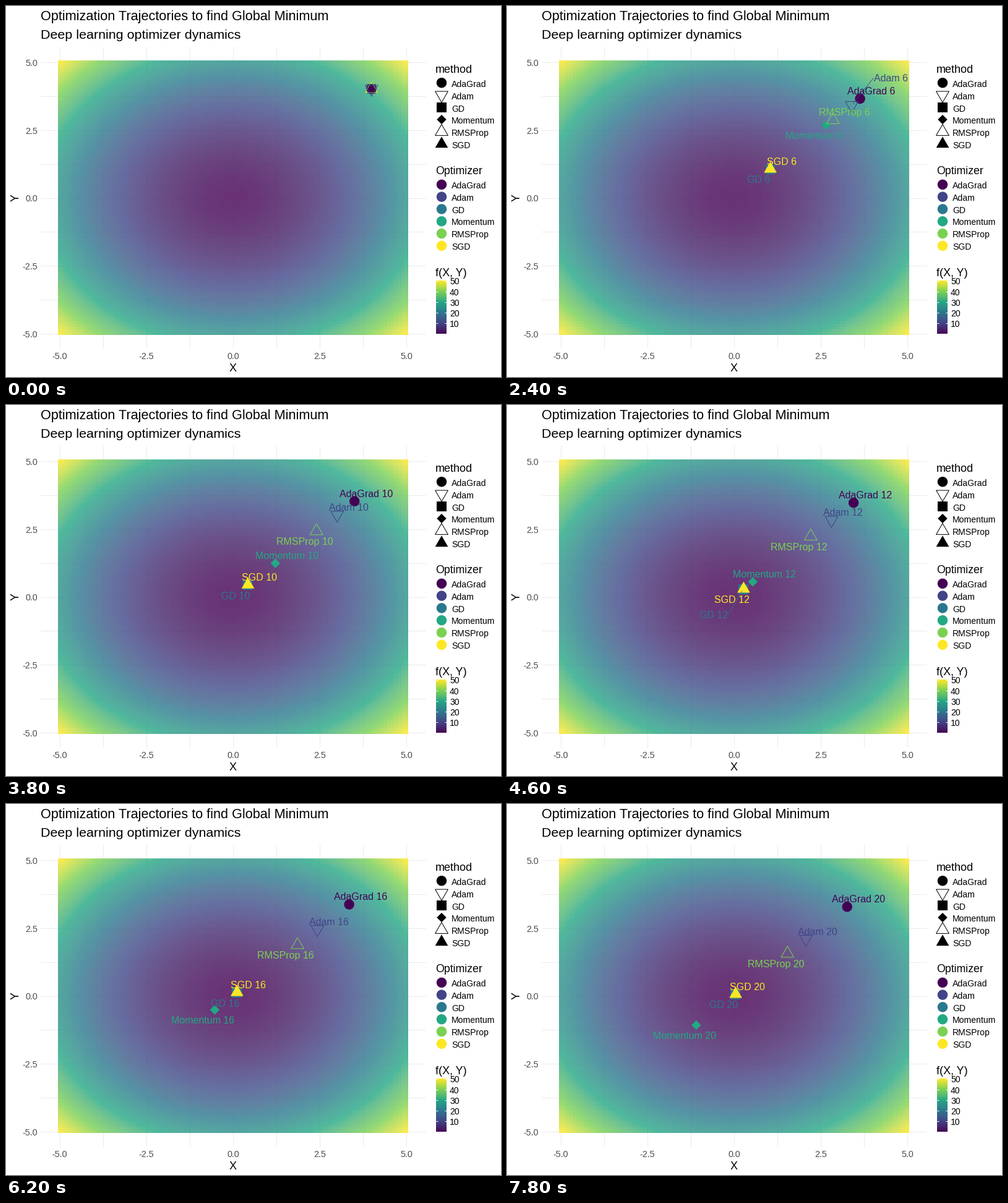
Animation, 800 px wide and 600 px high, one loop 8000 ms. Source, as a matplotlib script:

```python
import numpy as np
import matplotlib.pyplot as plt
from matplotlib.animation import FuncAnimation
from matplotlib.colors import ListedColormap, to_rgb
from matplotlib.patches import Polygon

W, H, DPI = 800, 600, 100
PX = 72 / DPI                      # points per pixel
FRAMES, INTERVAL = 40, 200
STEPS = FRAMES // 2

plt.rcParams["font.family"] = "Liberation Sans"
plt.rcParams["toolbar"] = "None"

NAMES = ["AdaGrad", "Adam", "GD", "Momentum", "RMSProp", "SGD"]
PALETTE = ["#440154", "#414487", "#2A788E", "#22A884", "#7AD151", "#FDE725"]
COLORS = dict(zip(NAMES, PALETTE))
DRAW_ORDER = ["GD", "SGD", "Momentum", "AdaGrad", "RMSProp", "Adam"]
LABEL_ORDER = ["AdaGrad", "SGD", "GD", "Momentum", "RMSProp", "Adam"]

# labels sit on one of two sides of their point, y pointing down
ABOVE, BELOW = np.array((18.5, -13)), np.array((-19, 16.5))
HOME_ABOVE = {"AdaGrad", "Adam", "SGD"}
REACHES = (1, 2.5, 3.4)
LABEL_H = 16

# marker outlines
R = 7.7
ANG = np.linspace(0, 2 * np.pi, 48, endpoint=False)
CIRCLE = 8.2 * np.column_stack([np.cos(ANG), np.sin(ANG)])
UP = R * np.array([(0, -1.555), (1.347, 0.778), (-1.347, 0.778)])
SHAPES = {
    "AdaGrad": CIRCLE,
    "Adam": UP * (1, -1),
    "GD": R * np.array([(-1, -1), (1, -1), (1, 1), (-1, 1)]),
    "Momentum": R * np.array([(0, -1), (1, 0), (0, 1), (-1, 0)]),
    "RMSProp": UP,
    "SGD": UP,
}
HOLLOW = {"Adam", "RMSProp"}


def lab_gradient(colors, n=512):
    """Colormap that blends the colours in CIE Lab space."""
    to_xyz = np.array([[0.4124, 0.3576, 0.1805],
                       [0.2126, 0.7152, 0.0722],
                       [0.0193, 0.1192, 0.9505]])
    to_lab = np.array([[0, 116, 0], [500, -500, 0], [0, 200, -200]])
    white = to_xyz.sum(axis=1)
    rgb = np.array([to_rgb(c) for c in colors])
    lin = np.where(rgb > 0.04045, ((rgb + 0.055) / 1.055) ** 2.4, rgb / 12.92)
    xyz = lin @ to_xyz.T / white
    f = np.where(xyz > 0.008856, np.cbrt(xyz), 7.787 * xyz + 16 / 116)
    lab = f @ to_lab.T
    t = np.linspace(0, len(colors) - 1, n)
    lab = np.column_stack([np.interp(t, range(len(colors)), c) for c in lab.T])
    f = lab @ np.linalg.inv(to_lab).T
    xyz = np.where(f > 0.2069, f ** 3, (f - 16 / 116) / 7.787) * white
    lin = np.clip(xyz @ np.linalg.inv(to_xyz).T, 0, 1)
    rgb = np.where(lin > 0.0031308, 1.055 * lin ** (1 / 2.4) - 0.055,
                   12.92 * lin)
    return ListedColormap(np.clip(rgb, 0, 1))


CMAP = lab_gradient(PALETTE)


def px(x):
    return 367 + 56.04 * x


def py(y):
    return 310 - 43.96 * y


def trajectories():
    """Coordinate (x = y) of every optimizer on f = x^2 + y^2."""
    x = {n: [4.0] for n in NAMES}
    vel = acc = sq = m = v = 0.0
    for t in range(1, STEPS + 1):
        g = {n: 2 * x[n][-1] for n in NAMES}
        vel = 0.9 * vel + 0.01 * g["Momentum"]
        acc += g["AdaGrad"] ** 2
        sq = 0.9 * sq + 0.1 * g["RMSProp"] ** 2
        m = 0.9 * m + 0.1 * g["Adam"]
        v = 0.999 * v + 0.001 * g["Adam"] ** 2
        m_hat, v_hat = m / (1 - 0.9 ** t), v / (1 - 0.999 ** t)
        move = {
            "GD": 0.1 * g["GD"],
            "SGD": 0.1 * g["SGD"] - 0.002,
            "Momentum": vel,
            "AdaGrad": 0.1 * g["AdaGrad"] / np.sqrt(acc),
            "RMSProp": 0.1 * g["RMSProp"] / np.sqrt(sq),
            "Adam": 0.1 * m_hat / np.sqrt(v_hat),
        }
        for n in NAMES:
            x[n].append(x[n][-1] - move[n])
    return x


PATHS = trajectories()


def point(name, step):
    x = PATHS[name][step]
    return np.array([px(x) - 0.5, py(x)])


def half_width(name, step):
    return 4.6 * len(f"{name} {step}")


def place_labels(step):
    """Centre and reach of each label: nearest free spot, home side first."""
    points = {n: point(n, step) for n in NAMES}
    placed = {}

    def is_free(name, c):
        hw = half_width(name, step)
        for other, (o, _) in placed.items():
            dx, dy = np.abs(c - o)
            if dx < hw + half_width(other, step) and dy < LABEL_H:
                return False
        return not any(abs(p[0] - c[0]) < hw and abs(p[1] - c[1]) < LABEL_H / 4
                       for p in points.values())

    for n in LABEL_ORDER:
        sides = (ABOVE, BELOW) if n in HOME_ABOVE else (BELOW, ABOVE)
        spots = [(points[n] + r * s, r) for r in REACHES for s in sides]
        placed[n] = next((s for s in spots if is_free(n, s[0])), spots[-2])
    return placed


fig = plt.figure(figsize=(W / DPI, H / DPI), dpi=DPI, facecolor="white")
ax = fig.add_axes([0, 0, 1, 1])


def text(x, y, s, size, color="black", ha="left", **kw):
    return ax.text(x, y, s, fontsize=size * PX, color=color, ha=ha,
                   va=kw.pop("va", "baseline"), **kw)


def line(xs, ys, color, width=1, z=0):
    return ax.plot(xs, ys, color=color, lw=width * PX, zorder=z,
                   solid_capstyle="butt")[0]


def marker(name, color, center=(0, 0), z=5):
    hollow = name in HOLLOW
    patch = Polygon(SHAPES[name] + center, closed=True, zorder=z,
                    facecolor="none" if hollow else color,
                    edgecolor=color if hollow else "none",
                    lw=PX if hollow else 0, joinstyle="miter")
    return ax.add_patch(patch)


def draw_panel():
    for v in np.arange(-5, 5.1, 1.25):
        line([px(v)] * 2, [66, 554], "#EBEBEB")
        line([56, 678], [py(v) + 0.5] * 2, "#EBEBEB")
    grid = np.linspace(-5, 5, 100)
    f = grid[:, None] ** 2 + grid[None, :] ** 2
    ax.imshow(f, cmap=CMAP, vmin=0, vmax=50, alpha=0.8, zorder=1,
              extent=(84, 650, 532, 88), interpolation="nearest")
    for v in np.arange(-5, 5.1, 2.5):
        text(px(v), 571, f"{v:.1f}", 14.4, "#4D4D4D", "center")
        text(51, py(v) + 6.5, f"{v:.1f}", 14.4, "#4D4D4D", "right")
    text(56, 23, "Optimization Trajectories to find Global Minimum", 21.7)
    text(56, 53, "Deep learning optimizer dynamics", 21.5)
    text(366.5, 591, "X", 18, ha="center")
    text(24.5, 310, "Y", 18, ha="right", va="center", rotation=90)


def draw_legends():
    text(694, 108, "method", 18)
    text(694, 272, "Optimizer", 17.7)
    for i, n in enumerate(NAMES):
        dy = 19.8 * i
        marker(n, "black", (704, 124.2 + dy))
        text(720, 131 + dy, n, 14)
        marker("AdaGrad", COLORS[n], (704, 288.8 + dy))
        text(720, 295 + dy, n, 14)
    text(694, 437, "f(X, Y)", 18)
    ax.imshow(np.linspace(1, 0, 256)[:, None], cmap=CMAP, zorder=1,
              extent=(695, 712, 530, 444), interpolation="bilinear")
    for v in range(10, 51, 10):
        y = 530.5 - 86 * v / 50
        line([695, 698.4], [y, y], "white", z=2)
        line([708.6, 712], [y, y], "white", z=2)
        text(717, y + 6, str(v), 14)


draw_panel()
draw_legends()
ax.set_aspect("auto")
ax.set_xlim(0, W)
ax.set_ylim(H, 0)
ax.axis("off")

marks, tags, leads = {}, {}, {}
for i, n in enumerate(DRAW_ORDER):
    marks[n] = marker(n, COLORS[n], z=10 + i)
    leads[n] = line([], [], COLORS[n], 0.8, z=20)
    tags[n] = text(0, 0, "", 16, COLORS[n], "center", zorder=21)


def leader(p, c, half_w):
    """Segment from the label box towards its point."""
    d = p - c
    if abs(d[0]) > half_w:
        start = c + (np.sign(d[0]) * half_w, 0)
    else:
        start = c + d * LABEL_H / 2 / abs(d[1])
    gap = p - start
    return start, p - gap / np.hypot(*gap) * 3


def update(frame):
    step = (frame + 1) // 2
    labels = place_labels(step)
    for n in NAMES:
        p = point(n, step)
        c, reach = labels[n]
        marks[n].set_xy(SHAPES[n] + p)
        tags[n].set_position((c[0], c[1] + 6))
        tags[n].set_text(f"{n} {step}" if step else "")
        if step and reach > 1:
            a, b = leader(p, c, half_width(n, step))
            leads[n].set_data([a[0], b[0]], [a[1], b[1]])
        else:
            leads[n].set_data([], [])
    return [*marks.values(), *leads.values(), *tags.values()]


anim = FuncAnimation(fig, update, frames=FRAMES, interval=INTERVAL,
                     init_func=lambda: update(0), repeat=True,
                     repeat_delay=0, blit=False)
plt.show()
```
